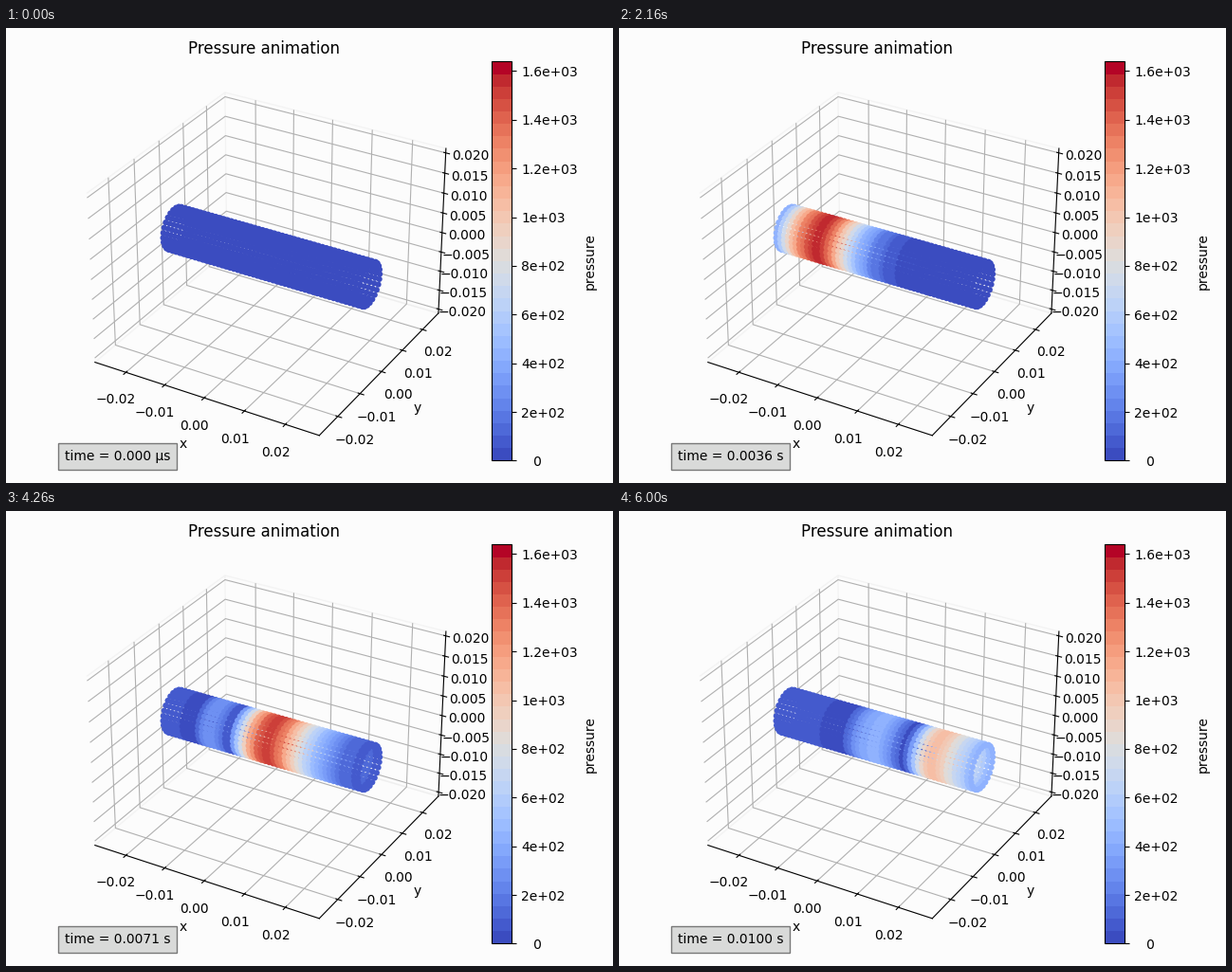
Write a matplotlib script that moves like this. It is 640x480 px and loops after 6.06 s.

```python
import numpy as np
import matplotlib.pyplot as plt
from matplotlib.animation import FuncAnimation
from matplotlib.cm import ScalarMappable
from matplotlib.colors import Normalize

W, H, DPI = 640, 480, 100
FRAMES, INTERVAL = 101, 60
BG = "#fcfcfc"
RINGS, SPOKES = 50, 26
RADIUS, SPACING = 0.005, 0.001
P_MAX = 1639
RING = np.arange(RINGS)


def ring_pressure(t):
    """Pressure per ring: a long head, a sharp back and a weaker echo."""
    peak = 0.442 * (t - 10.6)
    trough = 0.5465 * (t - 40.5)
    height = (1620 - 0.25 * (t - 52) ** 2) * min(1, t / 18)
    reach = 10.5 * min(1, 0.5 + t / 115)

    head = height * np.exp(-(np.maximum(RING - peak, 0) / reach) ** 1.5)
    back = height * np.sin(np.pi / 2 * (RING - trough) / (peak - trough))

    lag = (trough - RING) / max(1, 0.12 * (t - 34))
    echo = (230 + 4.6 * (t - 57)) * np.sin(np.pi / 2 * np.clip(lag, 0, 2))
    rest = 80 * np.clip(lag - 2, 0, 1)

    return np.where(RING >= peak, head,
                    np.where(RING >= trough, back, echo + rest))


def box(x, y, w, h):
    return [x / W, y / H, w / W, h / H]


fig = plt.figure(figsize=(W / DPI, H / DPI), dpi=DPI, facecolor=BG)
ax = fig.add_axes(box(62, 23.6, 421, 421), projection="3d", facecolor="none")
ax.set_title("Pressure animation")
ax.set_xlabel("x")
ax.set_ylabel("y")

cmap = plt.get_cmap("coolwarm", 32)
norm = Normalize(0, P_MAX)

ring, angle = np.meshgrid(RING, 2 * np.pi * np.arange(SPOKES) / SPOKES,
                          indexing="ij")
x = (ring - (RINGS - 1) / 2) * SPACING
points = ax.scatter(x.ravel(), (RADIUS * np.cos(angle)).ravel(),
                    (RADIUS * np.sin(angle)).ravel(),
                    c=np.zeros(x.size), cmap=cmap, norm=norm, s=20,
                    edgecolors="none", linewidths=0, depthshade=False)

half = 0.027 * 25 / 24
ax.set_xlim(-half, half)
ax.set_ylim(-half, half)
ax.set_zlim(-0.75 * half, 0.75 * half)
ax.set_xticks(np.arange(-2, 3) * 0.01)
ax.set_yticks(np.arange(-2, 3) * 0.01)
ax.set_zticks(np.arange(-4, 5) * 0.005)
for axis in (ax.xaxis, ax.yaxis, ax.zaxis):
    axis.pane.fill = False
    axis.pane.set_edgecolor("#ebebeb")

cax = fig.add_axes(box(512.2, 23.6, 21.05, 421))
fig.colorbar(ScalarMappable(norm, cmap), cax=cax, format="%4.2g",
             ticks=np.arange(0, 1601, 200), label="pressure")

clock = ax.text2D(0, 0, "", transform=ax.transAxes,
                  bbox=dict(boxstyle="square,pad=0.5", facecolor="#d9dad9",
                            edgecolor="#787878"))


def update(i):
    points.set_array(np.repeat(ring_pressure(i), SPOKES))
    clock.set_text(f"time = {i * 1e-4:.4f} s" if i else "time = 0.000 µs")
    return points, clock


anim = FuncAnimation(fig, update, frames=FRAMES, interval=INTERVAL,
                     repeat=True, repeat_delay=0, blit=False)
plt.show()
```
